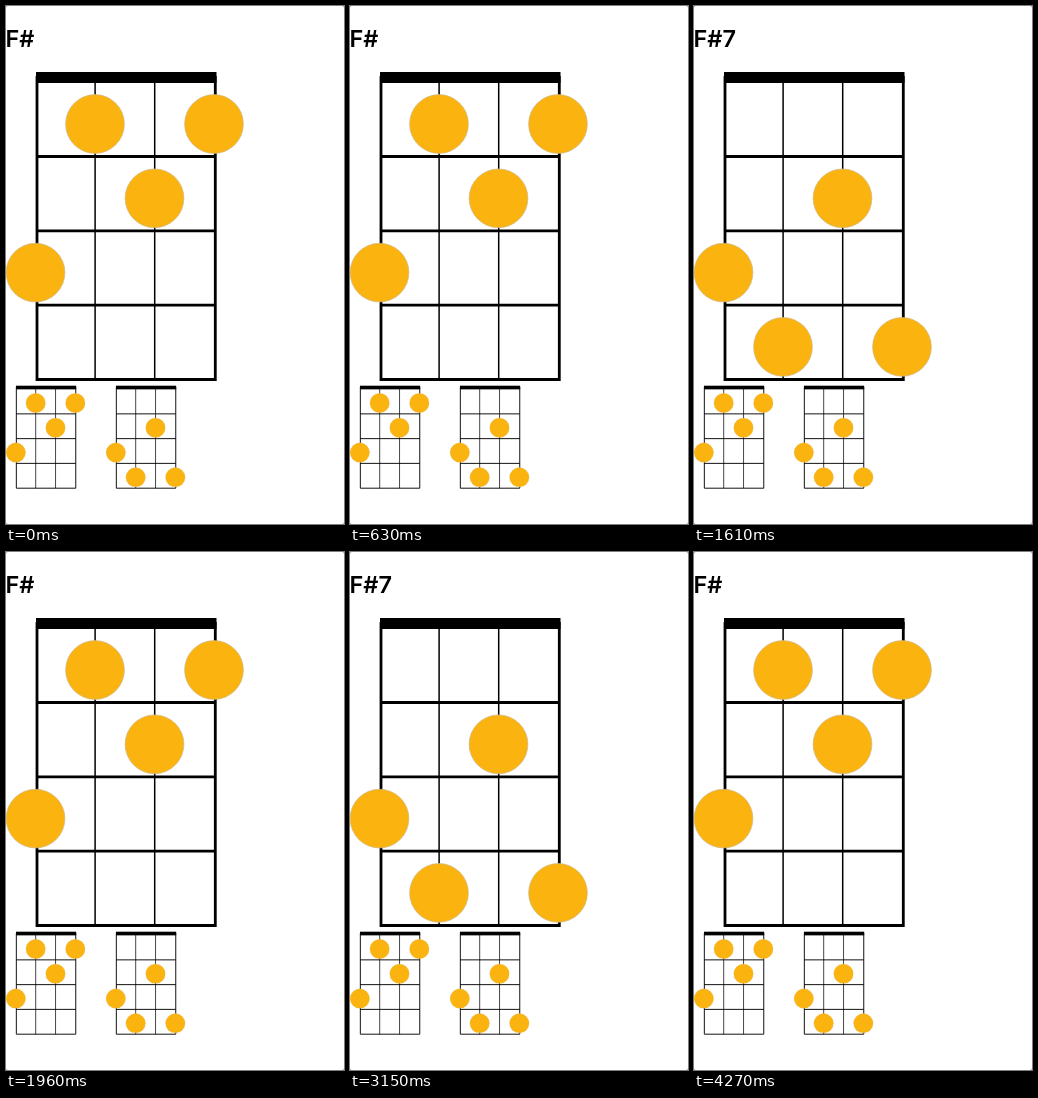
Animation of 338 by 518 pixels, one loop 4.34 s. Source, as an HTML page:

```html
<!DOCTYPE html>
<html lang="en">
<head>
<meta charset="utf-8">
<title>Chord chart</title>
<style>
html, body { margin: 0; width: 100%; height: 100%; overflow: hidden; background: #fff; }
svg { display: block; width: 338px; height: 518px; }
text { font: 600 23.5px Inter, "Open Sans", sans-serif; }
</style>
</head>
<body>
<svg id="stage" viewBox="0 0 338 518">
  <rect width="338" height="518" fill="#999"/>
  <rect width="338" height="518" rx="2" fill="#fff"/>
</svg>
<script>
const LOOP = 4340;
const FRAME = 70;
const ROOT = { name: 'F#', frets: [3, 1, 2, 1] };
const SEVENTH = { name: 'F#7', frets: [3, 4, 2, 4] };
// Start time of each chord
const STEPS = [[0, ROOT], [1400, SEVENTH], [1960, ROOT], [2520, SEVENTH], [3500, ROOT]];

const stage = document.getElementById('stage');

function add(parent, tag, attrs) {
  const el = document.createElementNS('http://www.w3.org/2000/svg', tag);
  for (const key in attrs) el.setAttribute(key, attrs[key]);
  return parent.appendChild(el);
}

function drawChart(parent, frets, thin) {
  add(parent, 'rect', { x: 30, y: 66, width: 180.5, height: 11 });
  const line = (d, width) =>
    add(parent, 'path', { d, fill: 'none', stroke: '#000', 'stroke-width': width });
  line('M31 70V373.5H209.3V70', 2.8);
  for (let i = 0; i < 3; i++) line(`M31 ${150.5 + i * 74.3}H209.3`, 2.8);
  line('M89.1 76V373.5M148.7 76V373.5', thin);
  frets.forEach((fret, i) => add(parent, 'circle', {
    cx: 29.5 + i * 59.5, cy: 43.7 + fret * 74.3, r: 29.4,
    fill: '#fbb40f', stroke: '#cdb98f', 'stroke-width': 0.7
  }));
}

const views = [ROOT, SEVENTH].map((chord, i) => {
  const view = add(stage, 'g', {});
  add(view, 'text', { x: -0.5, y: 41 }).textContent = chord.name;
  drawChart(view, chord.frets, 1.5);
  const mini = add(stage, 'g', { transform: `translate(${i * 100} 357.7) scale(.3333)` });
  drawChart(mini, chord.frets, 2.2);
  return { chord, view };
});

function draw(now) {
  const t = Math.floor((now % LOOP) / FRAME) * FRAME;
  const current = STEPS.filter(([start]) => start <= t).pop()[1];
  for (const { chord, view } of views) {
    view.setAttribute('visibility', chord === current ? 'visible' : 'hidden');
  }
}

const begin = performance.now();
function tick() {
  draw(performance.now() - begin);
  requestAnimationFrame(tick);
}
tick();
</script>
</body>
</html>
```
